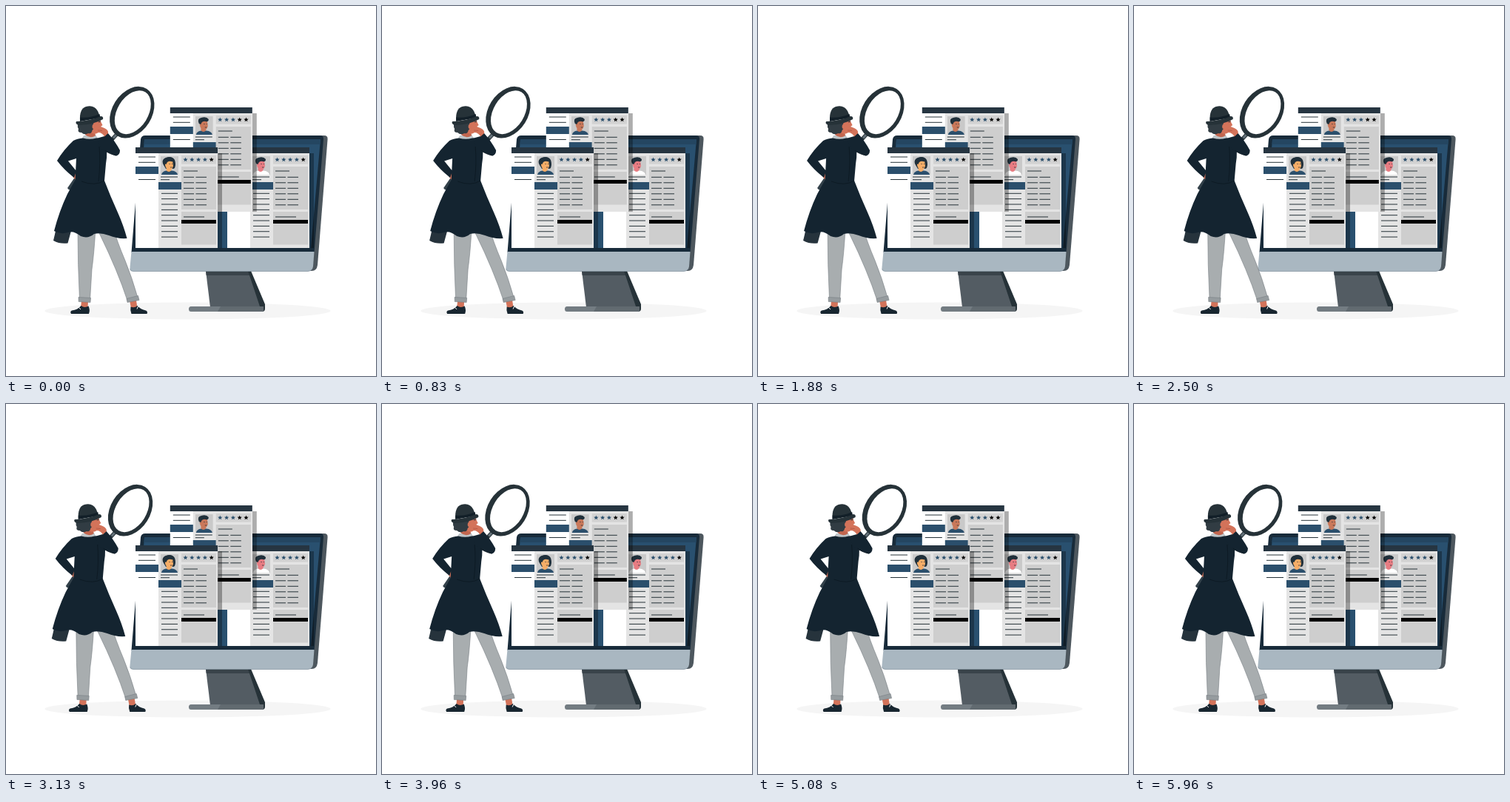
Write an HTML page that moves like this. It is 500x500 px and loops after 6 s.

```html
<!DOCTYPE html>
<html lang="en">
<head>
<meta charset="utf-8">
<title>Choosing a candidate</title>
<style>
html, body { margin: 0; width: 100%; height: 100%; overflow: hidden; background: #fff; }
svg { display: block; width: 100vw; height: 100vh; }
</style>
</head>
<body>
<svg viewBox="0 0 500 500">
  <defs>
    <clipPath id="view"><path d="M170 100H430V327H170Z"/></clipPath>
    <clipPath id="photo"><path d="M34 12H58V37H34Z"/></clipPath>
  </defs>

  <ellipse cx="245.5" cy="412" rx="193" ry="11.5" fill="#f5f5f5"/>

  <g id="monitor">
    <path d="M270 358H328L346 407H276Z" fill="#535c63"/>
    <path d="M270 358H328L330.500 364H270.700Z" fill="#39434a"/>
    <path d="M327 358H331L350 403V409Q350 413 346 413L343 406Z" fill="#263238"/>
    <path d="M250 406H348V413H250Q247 413 247 409.500T250 406Z" fill="#737c82"/>
    <path d="M290 406H348V413H286Z" fill="#616a70"/>
    <path d="M424 175H430Q435 175 434.600 180L421 350Q420 358 413 358H405Z" fill="#4d575e"/>
    <path d="M182 180Q183 175 188 175H424Q429.500 175 429 180L416.500 333H169.500Z" fill="#182b3a"/>
    <path d="M187 180H425L412 327H175Z" fill="#29506f"/>
    <path d="M187 180H425L424.400 187H186.400Z" fill="#244661"/>
    <path d="M169.500 332H416.500L415 352Q414 358.500 408 358.500H172Q167 358.500 167.500 353Z" fill="#a9b7c1"/>
    <path d="M167.500 355Q168 358.500 172 358.500H408Q412 358.500 414 355" fill="none" stroke="#7f8f9b" stroke-width=".7"/>
  </g>

  <g id="cards" clip-path="url(#view)"></g>

  <g id="person">
    <!-- magnifier -->
    <path d="M150 173L138 186" stroke="#263238" stroke-width="5"/>
    <path d="M149 174L145 178.500" stroke="#65727a" stroke-width="3"/>
    <ellipse rx="26.800" ry="37.500" transform="translate(170.300 143.700) rotate(32)" fill="#263238"/>
    <ellipse rx="20.800" ry="32.200" transform="translate(171.300 143.700) rotate(31.700)" fill="#fff"/>

    <!-- legs and shoes -->
    <g fill="#d3735a">
      <path d="M102 398H111L110.500 408H101Z"/>
      <path d="M167 398H176L177.500 408H169Z"/>
    </g>
    <g fill="#a8adaf" stroke="#777f83" stroke-width=".6">
      <path d="M121 300H145Q150 318 161 344Q170 366 178 394L164 398Q151 358 127 309Z"/>
      <path d="M97 300H121Q119 335 116 356L113.500 398H99.500Q97 350 97 300Z"/>
      <path d="M98 393.500L114.500 394.500L114 400.500L98.200 399.500Z" fill="#969c9f"/>
      <path d="M163 395.500L178.500 391.500L180 397.500L164 400.500Z" fill="#969c9f"/>
    </g>
    <g fill="#182630">
      <path d="M101.500 405Q106 408.500 111.500 405.500Q114 411 112 416H88Q86 413 89 411.500Q97 410.500 101.500 405Z"/>
      <path d="M168.500 406.500Q174 408.500 177.500 405Q182 410 189 411.500Q192 413 190.500 416H169.500Q167.500 411 168.500 406.500Z"/>
    </g>
    <path d="M98 407L101 410M178.500 406L177 409.500" stroke="#fff" stroke-width="1"/>

    <!-- coat -->
    <path d="M68 299Q66 309 64 317Q73 322 83.500 320.500L88 304Z" fill="#26333c"/>
    <path d="M94 230L83 246Q85 250 90 248L98 238Z" fill="#33414a"/>
    <path d="M92 222L96 227L95 236L90.500 231Z" fill="#d3735a"/>
    <path d="M105 175L121 174L126 182H101Z" fill="#bfc5c9"/>
    <g fill="#142430">
      <path d="M104 178.500Q113 181 122 178.500Q131 179 134 183Q138 196 135 213L133 236Q141 257 151 279Q159 297 163.500 314Q151 315 139 310Q128 306 119 308Q111 315 101 311Q91 303 84 306Q73 309 65 304Q72 277 83 254L93.500 235L95 206L84 209.500L95 223L92 232Q78 221 69 209Q78 194 91 182Q96 179 104 178.500Z"/>
      <path d="M122 179L133 176L137 171Q147 182 154 195Q154 201 149 202.500Q138 199 130 194Z"/>
    </g>
    <path d="M134 195Q139 200 149 202M133 236Q120 244 102 237M126 190Q128 212 125 237" fill="none" stroke="#0c1821" stroke-width=".8"/>

    <!-- head and hat -->
    <path d="M108 165L119 167L121 175Q114 180 107 174Z" fill="#c2664f"/>
    <path d="M112 155L127 152Q128 157 130.500 161L128 163Q129 169 124 171.500Q118 175 113 169Z" fill="#d3735a"/>
    <path d="M125 157L128 156" stroke="#263238" stroke-width="1"/>
    <path d="M121 167Q125 164 128 163L133 165Q139 168 138 172L133 176.500Q130 171 125 171Z" fill="#d3735a"/>
    <path d="M124 168L130 168.500" stroke="#a94f40" stroke-width=".7"/>
    <path d="M99 157L118 153Q119 158 117.500 161Q120 165 116.500 168Q116 173 111 172Q106 175 102 171Q96 171 98 166Q95 161 99 157Z" fill="#313c43"/>
    <ellipse cx="118.500" cy="163" rx="2" ry="3" fill="#d3735a"/>
    <path d="M100 155Q99 139 108 136Q119 133 124 142Q126 146 127 151Z" fill="#263238"/>
    <path d="M100 150.500Q113 152 126.500 146L127.500 151L100 156Z" fill="#121f28"/>
    <path d="M95 156Q112 156 128 149Q132 149 131 153Q120 160 98 161Q93 159 95 156Z" fill="#263238"/>
  </g>
</svg>
<script>
const rect = (x, y, w, h, fill) => `<rect x="${x}" y="${y}" width="${w}" height="${h}" fill="${fill}"/>`;
const line = (x1, x2, y, color = '#263238') => rect(x1, y - .5, x2 - x1, 1, color);
const rows = (count, start, step, draw) =>
  Array.from({ length: count }, (_, i) => draw(start + i * step)).join('');

function star(cx, cy, fill) {
  const points = Array.from({ length: 10 }, (_, i) => {
    const r = i % 2 ? 1.4 : 3.3, a = i * Math.PI / 5;
    return `${cx + r * Math.sin(a)},${cy - r * Math.cos(a)}`;
  });
  return `<polygon points="${points.join(' ')}" fill="${fill}"/>`;
}

function portrait({ skin, shirt, hair }) {
  return `<g clip-path="url(#photo)">${rect(34, 12, 24, 25, '#c9c9c9')}
    <path d="M35 37Q36 32 42 31.500H49Q56 32 57 37Z" fill="${shirt}"/>
    <path d="M42 25H48.500V31Q45 35 41.500 31Z" fill="${skin}"/>
    ${hair}
    <path d="M40 18Q45 15 50 18L51 25Q50 30 46.500 30Q41 30 40 24Z" fill="${skin}"/>
    <path d="M39 22Q36 15 42 14Q49 12 52 16Q52 20 48 19Q43 18 41.500 23Z" fill="#20303b"/>
    <path d="M45.500 22.500H46.800M49 22.500H50M47 27H49.500" stroke="#263238" stroke-width=".8"/></g>`;
}

function card({ x, y, blueStars, person }) {
  const blue = '#2b4f6c';
  return `<g transform="translate(${x} ${y})">
    ${rect(111, 8, 6, 133, 'rgba(0,0,0,.32)')}
    ${rect(0, 0, 111, 141, '#fff')}
    ${rect(31, 8, 80, 133, '#e4e4e4')}
    ${rect(0, 0, 111, 8, '#263541')}
    ${rows(2, 13, 7.3, y => line(4, 27, y))}
    ${rect(0, 26, 31, 10, blue)}
    ${line(4, 27, 43.5)}
    ${portrait(person)}
    ${line(34, 57, 40)}${line(34, 46, 43.7)}
    ${rect(31, 47, 31, 10, blue)}
    ${rows(9, 62.3, 7.35, y => line(35, 57, y))}
    ${rect(62, 11, 47, 11.5, '#d2d2d2')}
    ${rows(5, 0, 1, i => star(67.5 + i * 8.8, 16.7, i < blueStars ? blue : '#000'))}
    ${rect(62, 26, 47, 58, '#cecece')}
    ${line(65, 84, 32)}
    ${rows(6, 40.3, 7.5, y => line(65, 79, y) + line(81.5, 96, y))}
    ${rect(62, 87, 47, 44.5, '#cecece')}
    ${line(65, 93, 94)}
    ${rect(62, 98, 47, 5, '#000')}
  </g>`;
}

const curls = '<path d="M38 24Q34 17 41 14Q49 11 53 17Q55 23 53 28Q49 31 48 25L41 29Z" fill="#20303b"/>';
document.getElementById('cards').innerHTML = [
  { x: 299, y: 191, blueStars: 4, person: { skin: '#e77c82', shirt: '#fff', hair: '' } },
  { x: 221.8, y: 137, blueStars: 3, person: { skin: '#c9785a', shirt: '#2b4f6c', hair: '' } },
  { x: 175, y: 191, blueStars: 4, person: { skin: '#f6ad67', shirt: '#2b4f6c', hair: curls } },
].map(card).join('');

// Sideways shake: offsets at equal tenths of the loop, joined linearly.
const LOOP = 6000;
const shake = [0, -1, 2, -4, 4, -4, 4, -4, 2, -1, 0];
const person = document.getElementById('person');

function frame() {
  const p = performance.now() % LOOP / LOOP * 10;
  const i = Math.floor(p);
  const x = shake[i] + (shake[i + 1] - shake[i]) * (p - i);
  person.setAttribute('transform', `translate(${x.toFixed(3)} 0)`);
  requestAnimationFrame(frame);
}
frame();
</script>
</body>
</html>
```
